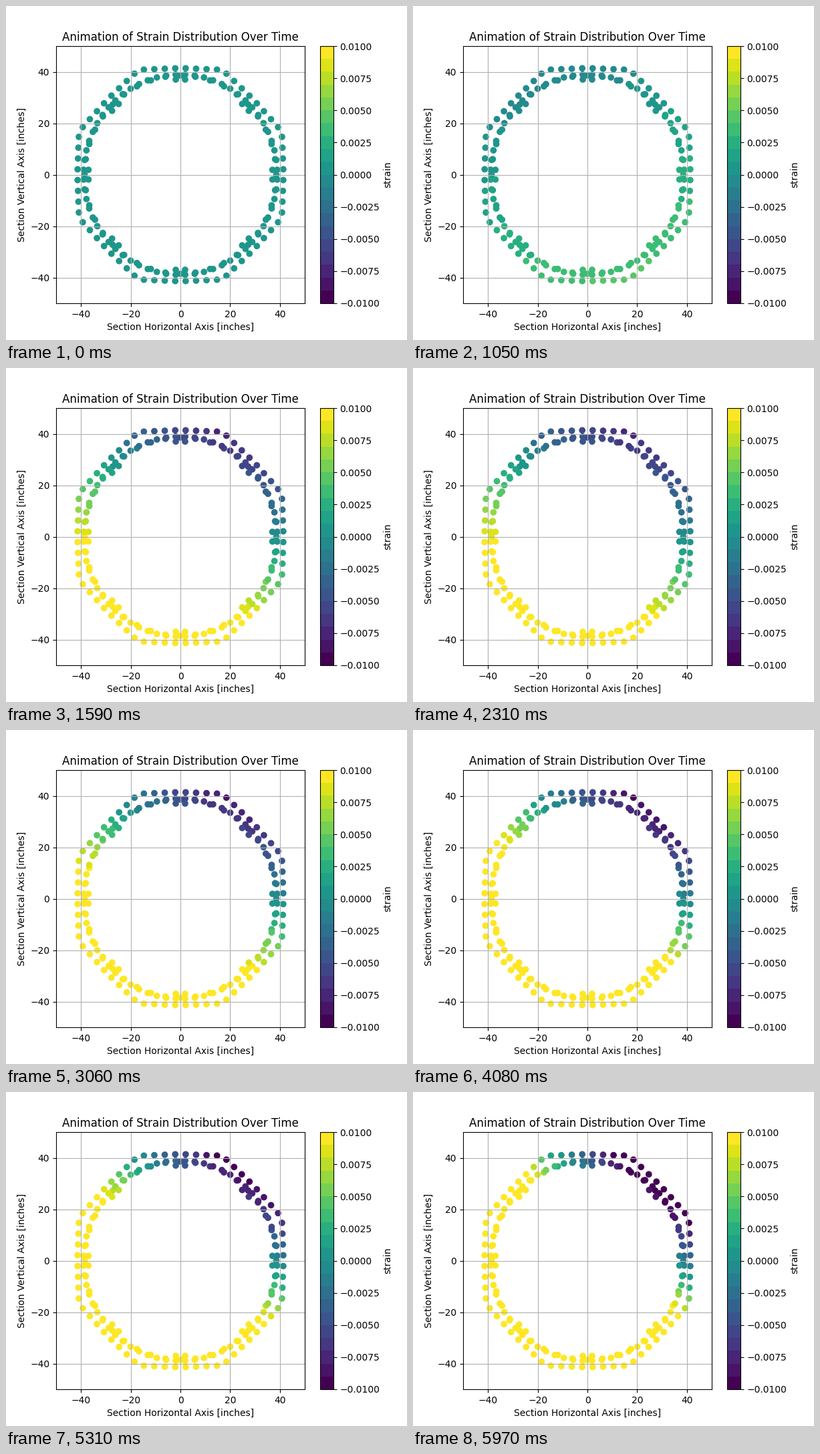
Recreate the animation shown at these times as a matplotlib script. Size 600 by 500 pixels, loop 6000 ms.

```python
import numpy as np
import matplotlib.pyplot as plt
from matplotlib.animation import FuncAnimation

FRAMES, STEP = 200, 30
SWAY, YIELD, END = 1.05, 1.59, 6.0  # seconds

# axial strain, slope in x, slope in y (1e-5): at rest, swaying, yielding, final
POSES = np.array([(20, 0, 0), (170, 2, -5.5), (460, -11.5, -25), (1610, -45, -50.5)])


def ring(radius, angles):
    a = np.radians(angles)
    return radius * np.exp(1j * a)


def section():
    """Octagonal cover, round core and reinforcing bars as complex points."""
    k = np.arange(4)
    face = 2.1 * (2 * k + 1) + 1j * (41.36 - 0.17 * k)
    face = np.concatenate([face, -face.conj()])
    turns = ring(1, np.arange(0, 360, 45))
    cover = np.outer(turns, face).ravel()
    core = ring(38.97, 360 / 64 * (np.arange(64) + 0.5))
    bars = ring(38.55, np.arange(0, 360, 9))
    ties = np.outer(turns, ring(37.05, [-2.9, 2.9])).ravel()
    z = np.concatenate([bars, core, ties, cover])
    return z.real, z.imag


def progress(t):
    """Position along the poses: build-up, sudden yield, then cyclic growth."""
    if t < SWAY:
        return (t / SWAY) ** 2
    if t < YIELD:
        return 2 - ((YIELD - t) / (YIELD - SWAY)) ** 2
    u = (t - YIELD) / (END - YIELD)
    unload = (1 - np.cos(2 * np.pi * (t - YIELD) / 0.49)) / 2
    return 2 + u ** 1.7 - 0.31 * u * unload


def strain(t):
    p = progress(t)
    a, bx, by = (np.interp(p, range(len(POSES)), col) for col in POSES.T)
    return (a + bx * xs + by * ys) * 1e-5


xs, ys = section()

fig, ax = plt.subplots(figsize=(6, 5), dpi=100)
dots = ax.scatter(xs, ys, c=strain(0), cmap=plt.get_cmap("viridis", 20),
                  vmin=-0.01, vmax=0.01)
fig.colorbar(dots, ax=ax, label="strain")
ax.set(xlim=(-50, 50), ylim=(-50, 50),
       xlabel="Section Horizontal Axis [inches]",
       ylabel="Section Vertical Axis [inches]",
       title="Animation of Strain Distribution Over Time")
ax.grid(True)


def update(i):
    dots.set_array(strain(i * STEP / 1000))
    return (dots,)


anim = FuncAnimation(fig, update, frames=FRAMES, interval=STEP,
                     repeat=True, repeat_delay=0, blit=False)
plt.show()
```
